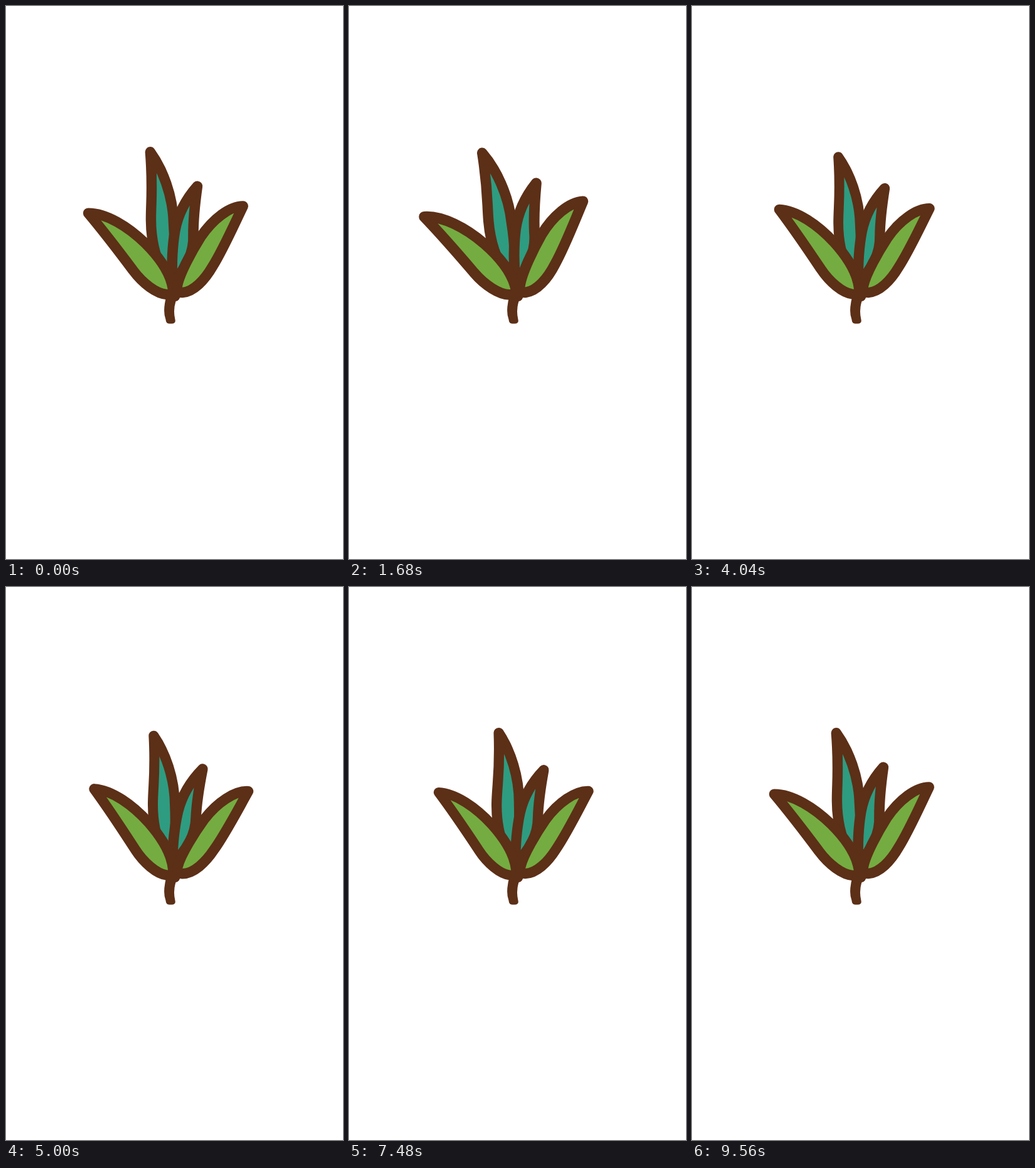
Recreate the animation shown at these times as an HTML page. Size 537 by 880 pixels, loop 9.6 s.

```html
<!DOCTYPE html>
<html lang="en">
<head>
<meta charset="utf-8">
<title>Swaying plant</title>
<style>
  html, body { margin: 0; width: 100%; height: 100%; overflow: hidden; background: #fff; }
  svg { display: block; width: 100%; height: 100%; }
  .leaf { stroke: #5c2f17; stroke-width: 16.5; stroke-linejoin: round; }
  .back { fill: #2e9c80; }
  .front { fill: #74ac41; }
  .stem { fill: #5c2f17; }
</style>
</head>
<body>
<svg viewBox="0 0 537 880">
  <path id="tall" class="leaf back" d="M230.7 231.2C250 258 266.5 300 267.5 345C270 380 268 420 264 445C245 420 231.3 385 231.3 340C231.3 310 235 290 230.7 231.2Z"/>
  <path id="mid" class="leaf back" d="M306 288C288 308 275 332 270 358C266 380 264 405 265 440C285 420 300 395 299 365C299 340 302 315 306 288Z"/>
  <path id="left" class="leaf front" d="M131.3 328.6C160 328.6 195 350.5 222 377C243 398 262 424 266 450Q267 459 258 459C240 459 217 440 203 421C180 390 160 363 131.3 328.6Z"/>
  <path id="right" class="leaf front" d="M378.6 318.4C357 318.4 330 339 311 367C297 389 277 425 273 445Q271 456 281 456C299 455 317 436 329.5 414.5C345 390 358 361 378.6 318.4Z"/>
  <path class="stem" d="M256 460Q249 485 254.5 499Q255 505.5 260 505.5H264Q271 505.5 269.5 499Q266 484 270.5 470Q277 469 278 460Z"/>
</svg>
<script>
const LOOP = 9600, STEP = 40;
const { sin, cos, PI } = Math;

// Every leaf sways about its base: `side` moves the tip clockwise,
// `along` stretches it, both in pixels for a loop phase p.
const leaves = [
  {
    id: 'left', base: [262, 456], tip: [131, 328],
    side: p => 2.7 - 11 * sin(p + 0.61) - 4.8 * sin(2 * p - 0.6),
    along: p => -1.8 + 3.9 * sin(p + 0.14) + 2.6 * sin(2 * p + 0.26)
  },
  {
    id: 'right', base: [277, 455], tip: [379, 318],
    side: p => 2.4 - 11 * sin(p + 0.64) + 3 * sin(2 * p + 0.4) + 2.3 * cos(3 * p),
    along: p => -1 + 1.5 * sin(p + 0.35) + 2.7 * sin(2 * p)
  },
  {
    id: 'tall', base: [264, 443], tip: [230.5, 230.5],
    side: p => -0.8 - 12.1 * sin(p + 0.36) - 3.6 * sin(2 * p - 0.51) + 2.3 * cos(3 * p),
    along: p => -3.2 + 3.2 * cos(p + 0.25) + 3 * sin(2 * p - 0.29)
  },
  {
    id: 'mid', base: [266, 440], tip: [306, 287.5],
    side: p => 1.4 - 9.5 * sin(p + 0.64) + 2 * sin(2 * p + 0.4) + 2.1 * cos(3 * p),
    along: p => 0.3 + 1.5 * sin(p + 0.35) + 2.7 * sin(2 * p)
  }
];
for (const leaf of leaves) leaf.el = document.getElementById(leaf.id);

function pose({ el, base: [x, y], tip, side, along }, p) {
  const len = Math.hypot(tip[0] - x, tip[1] - y);
  const re = 1 + along(p) / len, im = side(p) / len;
  el.setAttribute('transform',
    `translate(${x} ${y}) matrix(${re} ${im} ${-im} ${re} 0 0) translate(${-x} ${-y})`);
}

function draw(now) {
  const t = Math.floor((now % LOOP) / STEP) * STEP;
  const p = 2 * PI * t / (LOOP - STEP);
  for (const leaf of leaves) pose(leaf, p);
}

const start = performance.now();
function tick() {
  draw(performance.now() - start);
  requestAnimationFrame(tick);
}
tick();
</script>
</body>
</html>
```
